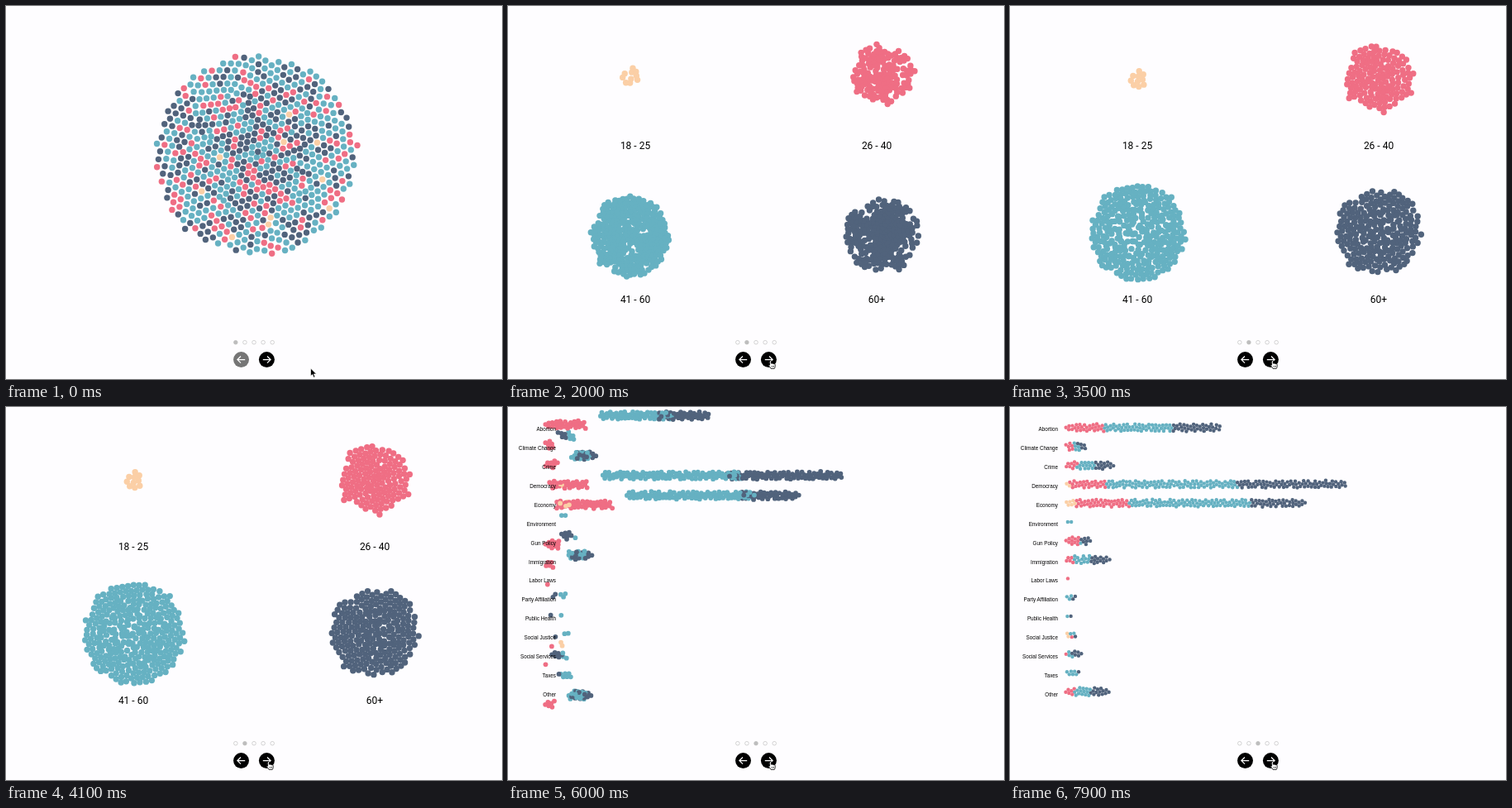
Write an HTML page with a canvas that moves like this. It is 600x451 px and loops after 8 s.

```html
<!DOCTYPE html>
<html lang="en">
<head>
<meta charset="utf-8">
<title>Voters by age and issue</title>
<style>
  html, body { margin: 0; width: 600px; height: 451px; overflow: hidden; background: #fefdff; }
  canvas, svg { position: absolute; left: 0; top: 0; width: 600px; height: 451px; display: block; }
  .ages text { font: 12px Roboto, Arial, sans-serif; text-anchor: middle; }
  .issues text { font: 6.3px "Liberation Sans", Arial, sans-serif; text-anchor: end; }
  .pager circle { fill: none; stroke: #c8c8c8; stroke-width: .8; }
  .pager circle.on { fill: #bdbdbd; stroke: #bdbdbd; }
  .arrow { fill: none; stroke: #fff; stroke-width: 1.2; }
</style>
</head>
<body>
<canvas id="stage"></canvas>
<svg viewBox="0 0 600 451">
  <g class="ages" id="ages"></g>
  <g class="issues" id="issues"></g>
  <g class="pager" id="pager"></g>
  <circle id="back" cx="284.5" cy="427.6" r="9.5"/>
  <circle cx="315.4" cy="427.6" r="9.5"/>
  <path class="arrow" d="M289.2 427.6h-9M284 423.5l-4.1 4.1 4.1 4.1"/>
  <path class="arrow" d="M310.8 427.6h9M316 423.5l4.1 4.1-4.1 4.1"/>
  <g id="pointer">
    <path d="M0 0V9.6L2.2 7.6 3.8 11.2 5.5 10.4 3.9 7H7Z" stroke="#fff" stroke-width=".7"/>
  </g>
  <g id="hand" transform="translate(315 427.8)">
    <path d="M1.6 1.2Q2.6 0 3.4 1.2V4.4Q4.4 3.7 5.1 4.6Q6 4 6.7 5Q8 4.6 8.2 5.8V8Q8 9.4 7.3 10.6H3Q1.8 8.6.2 6.9Q0 5.6 1.6 6.4Z" fill="#fff" stroke="#000" stroke-width=".8"/>
    <path d="M3.9 7v2M5.3 7v2M6.6 7v2" stroke="#000" stroke-width=".5"/>
  </g>
</svg>
<script>
const LOOP = 8000, SPLIT = 1560, SORT = 5470, TAU = Math.PI * 2;
const BLOB = { x: 302, y: 180, r: 121 };
const DOT = 3.7, SMALL = 2.2;

// r0: radius right after the split, r1: settled radius, ease: settling exponent
const groups = [
  { name: '18 - 25', color: '#fbcfa6', x: 155, y: 89, r0: 14.5, r1: 14, ease: 6, lx: 154, ly: 173.3 },
  { name: '26 - 40', color: '#ef6e84', x: 446, y: 87, r0: 38.5, r1: 45.5, ease: 1.9, lx: 446, ly: 173.3 },
  { name: '41 - 60', color: '#66b1c2', x: 154.5, y: 274, r0: 50.5, r1: 68, ease: 1.4, lx: 154, ly: 358.5 },
  { name: '60+', color: '#51637c', x: 446, y: 272.5, r0: 45.5, r1: 57.5, ease: 1.9, lx: 446, ly: 358.5 }
];

// label, right end of the swarm, dots per age group
const issues = [
  ['Abortion', 253, [0, 28, 52, 36]],
  ['Climate Change', 89, [0, 6, 5, 5]],
  ['Crime', 123, [0, 8, 14, 14]],
  ['Democracy', 405, [2, 26, 95, 78]],
  ['Economy', 355, [6, 40, 90, 40]],
  ['Environment', 74, [0, 0, 2, 0]],
  ['Gun Policy', 95, [0, 11, 1, 7]],
  ['Immigration', 118, [0, 5, 13, 14]],
  ['Labor Laws', 71, [0, 1, 0, 0]],
  ['Party Affiliation', 78, [0, 0, 3, 2]],
  ['Public Health', 73, [0, 0, 1, 1]],
  ['Social Justice', 78, [2, 1, 2, 1]],
  ['Social Services', 84, [0, 1, 3, 6]],
  ['Taxes', 82, [0, 0, 6, 1]],
  ['Other', 117, [0, 6, 14, 14]]
];

// where the youngest voters sit in the opening crowd
const young = [[339, 133], [337, 166], [376, 164], [256, 187], [235, 221],
  [380, 212], [389, 245], [322, 259], [321, 267], [272, 275]];

let seed = 41;
function rand() {
  seed = (seed + 0x6D2B79F5) | 0;
  let n = Math.imul(seed ^ (seed >>> 15), 1 | seed);
  n = (n + Math.imul(n ^ (n >>> 7), 61 | n)) ^ n;
  return ((n ^ (n >>> 14)) >>> 0) / 4294967296;
}
const jitter = a => (rand() * 2 - 1) * a;
const clamp = v => Math.max(0, Math.min(1, v));
const smooth = v => { v = clamp(v); return v * v * (3 - 2 * v); };
const mix = (a, b, k) => a + (b - a) * k;

// damped spring: 1 at rest before the start, overshoots zero, then settles
function spring(ms) {
  if (ms <= 0) return 1;
  const p = ms / 520 * Math.PI, k = .9;
  return Math.exp(-k * p) * (Math.cos(p) + k * Math.sin(p));
}

const inward = p => { p.x *= .9985; p.y *= .9985; };

// push points closer than gap apart while pull draws them home
function relax(points, gap, rounds, pull = inward) {
  while (rounds-- > 0) {
    points.forEach(pull);
    for (let i = 1; i < points.length; i++) {
      const a = points[i];
      for (let j = 0; j < i; j++) {
        const b = points[j], dx = a.x - b.x, dy = a.y - b.y;
        if (dx >= gap || dx <= -gap) continue;
        const q = dx * dx + dy * dy;
        if (q >= gap * gap) continue;
        const dist = Math.sqrt(q) || .01, f = (gap - dist) / dist * .35;
        a.x += dx * f; a.y += dy * f;
        b.x -= dx * f; b.y -= dy * f;
      }
    }
  }
  return points;
}

// centre the points and scale them to a disc whose dots reach radius r
function fit(points, r) {
  const mean = f => points.reduce((s, p) => s + f(p), 0) / points.length;
  const mx = mean(p => p.x), my = mean(p => p.y);
  const spread = Math.sqrt(2 * mean(p => (p.x - mx) ** 2 + (p.y - my) ** 2));
  const k = (r - DOT + .7) / spread;
  return points.map(p => ({ x: (p.x - mx) * k, y: (p.y - my) * k }));
}

function makeDots() {
  const dots = [];
  issues.forEach(([, end, counts], n) => {
    const ages = counts.flatMap((count, g) => Array(count).fill(g));
    const row = ages.map((g, i) => {
      const home = mix(70, end, i / Math.max(1, ages.length - 1));
      return { home, x: home + jitter(1), y: jitter(Math.min(3, ages.length / 2)) };
    });
    relax(row, 4.3, 60, p => { p.x = mix(p.x, p.home, .06); p.y *= .94; });
    row.forEach((p, i) => dots.push({ g: ages[i], row: { x: p.x, y: p.y + 25 + n * 22.8 } }));
  });
  for (let i = dots.length - 1; i > 0; i--) {
    const j = Math.floor(rand() * (i + 1));
    [dots[i], dots[j]] = [dots[j], dots[i]];
  }
  return dots;
}

function placeBlob(dots) {
  const step = BLOB.r / Math.sqrt(dots.length), turn = Math.PI * (3 - Math.sqrt(5));
  const spiral = dots.map((_, i) => {
    const r = step * Math.sqrt(i + .5);
    return { x: r * Math.cos(i * turn) + jitter(2), y: r * Math.sin(i * turn) + jitter(2) };
  });
  const spots = fit(relax(spiral, 8.3, 200), BLOB.r);
  const take = i => spots.splice(i, 1)[0];
  dots.filter(d => d.g === 0).forEach((d, n) => {
    const [x, y] = young[n];
    const far = spots.map(s => Math.hypot(s.x + BLOB.x - x, s.y + BLOB.y - y));
    d.blob = take(far.indexOf(Math.min(...far)));
  });
  dots.filter(d => d.g > 0).forEach(d => { d.blob = take(0); });
}

// squeezed layout right after the split, and the settled one
function placeCluster(list, group) {
  const shrink = group.r0 / BLOB.r;
  const points = list.map(d => ({ x: d.blob.x * shrink, y: d.blob.y * shrink }));
  const loose = fit(relax(points, 5.2, 10), group.r0);
  const tight = fit(relax(points, 7.5, 250), group.r1);
  list.forEach((d, i) => { d.loose = loose[i]; d.tight = tight[i]; });
}

const dots = makeDots();
placeBlob(dots);
groups.forEach((group, g) => placeCluster(dots.filter(d => d.g === g), group));

const $ = id => document.getElementById(id);
function add(parent, tag, attrs, text = '') {
  const el = document.createElementNS('http://www.w3.org/2000/svg', tag);
  for (const key in attrs) el.setAttribute(key, attrs[key]);
  el.textContent = text;
  return $(parent).appendChild(el);
}
groups.forEach(g => add('ages', 'text', { x: g.lx, y: g.ly }, g.name));
issues.forEach(([name], i) => add('issues', 'text', { x: 58, y: 29 + i * 22.93 }, name));
const pages = [0, 1, 2, 3, 4].map(i => add('pager', 'circle', { cx: 277.8 + i * 11.1, cy: 406.7, r: 2.3 }));

const canvas = $('stage'), ctx = canvas.getContext('2d');
const ratio = window.devicePixelRatio || 1;
canvas.width = 600 * ratio;
canvas.height = 451 * ratio;
ctx.scale(ratio, ratio);

function drawDots(t) {
  const split = spring(t - SPLIT), sort = spring(t - SORT);
  // only the centres overshoot; offsets within a cluster just fade
  const blobShare = Math.max(0, split), localShare = Math.max(0, sort);
  const settle = clamp((t - 2000) / 3300);
  const grown = groups.map(g => 1 - (1 - settle) ** g.ease);
  const r = mix(DOT, SMALL, smooth((t - SORT) / 1000));
  ctx.clearRect(0, 0, 600, 451);
  for (const d of dots) {
    const g = groups[d.g], k = grown[d.g];
    const at = axis => {
      const local = mix(mix(d.loose[axis], d.tight[axis], k), d.blob[axis], blobShare);
      const centre = mix(g[axis], BLOB[axis], split);
      return mix(d.row[axis], centre, sort) + local * localShare;
    };
    ctx.fillStyle = g.color;
    ctx.beginPath();
    ctx.arc(at('x'), at('y'), r, 0, TAU);
    ctx.fill();
  }
}

const show = (id, on) => { $(id).style.display = on ? '' : 'none'; };

function drawControls(t) {
  const page = t < SPLIT ? 0 : t < SORT ? 1 : 2;
  show('ages', page === 1);
  show('issues', page === 2);
  pages.forEach((p, i) => p.classList.toggle('on', i === page));
  $('back').setAttribute('fill', page ? '#000' : '#757575');
  const move = smooth((t - 200) / 600);
  const x = mix(368.5, 318, move), y = mix(438, 429, move);
  const over = Math.hypot(x - 315.4, y - 427.6) < 9.5;
  $('pointer').setAttribute('transform', `translate(${x} ${y})`);
  show('pointer', !over);
  show('hand', over);
}

const start = performance.now();
function frame() {
  const t = (performance.now() - start) % LOOP;
  drawDots(t);
  drawControls(t);
  requestAnimationFrame(frame);
}
frame();
</script>
</body>
</html>
```
